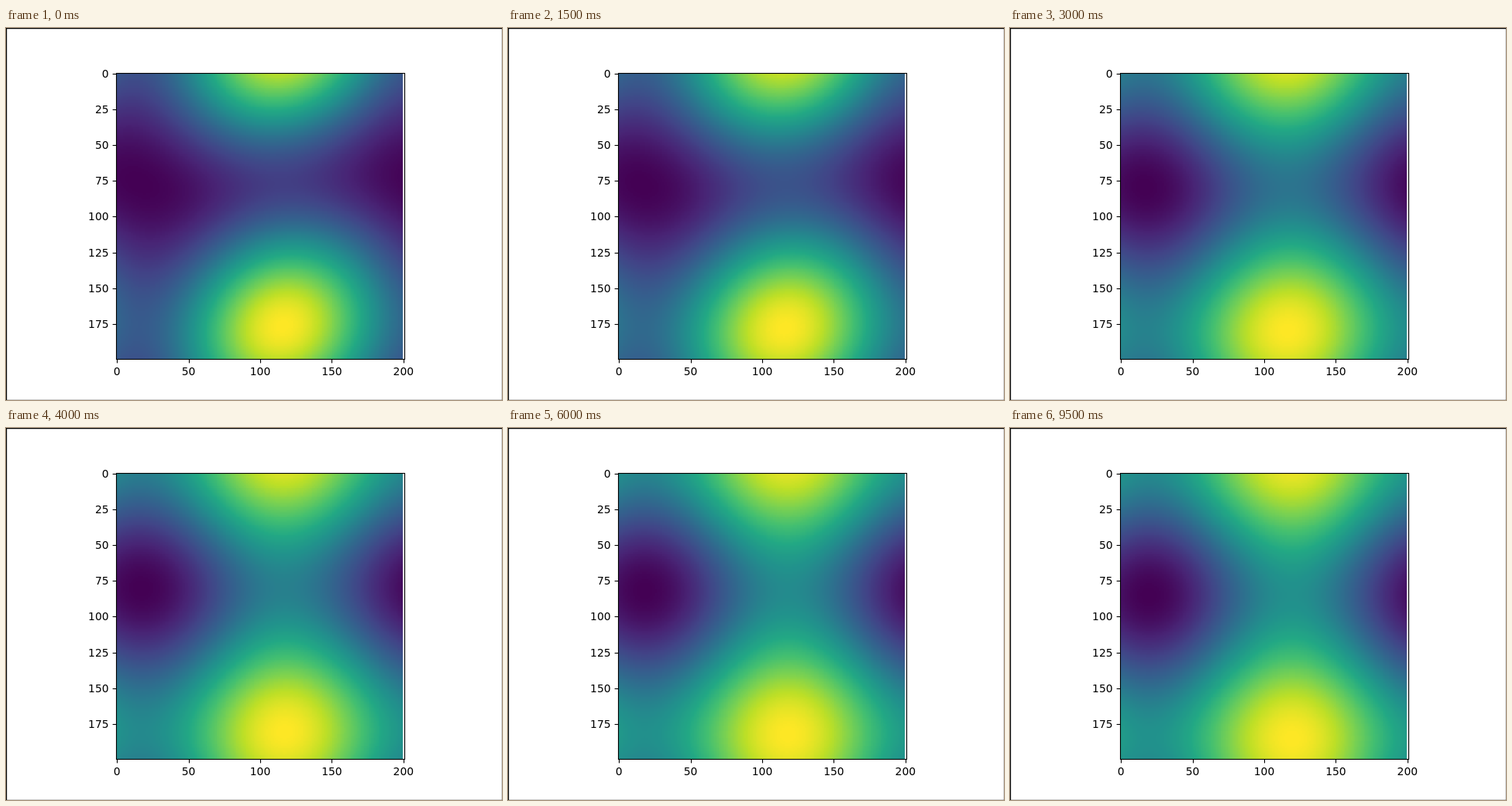
Animation of 640 by 480 pixels, one loop 10 s. Source, as an HTML page with a canvas:

```html
<!DOCTYPE html>
<html>
<head>
<meta charset="utf-8">
<style>
html, body { margin: 0; width: 100%; height: 100%; overflow: hidden; background: #fff; }
canvas { display: block; }
</style>
</head>
<body>
<canvas id="stage" width="640" height="480"></canvas>
<script>
const SIZE = 200, LEFT = 142.3, TOP = 57.6, SCALE = 1.848;
const ctx = document.getElementById('stage').getContext('2d');
const grid = document.createElement('canvas');
grid.width = grid.height = SIZE;
const gridCtx = grid.getContext('2d');
const image = gridCtx.createImageData(SIZE, SIZE);

const stops = '440154 482475 414487 355f8d 2a788e 21918c 22a884 44bf70 7ad151 bddf26 fde725'
  .split(' ').map(hex => [0, 2, 4].map(i => parseInt(hex.slice(i, i + 2), 16)));
const palette = Array.from({ length: 256 }, (_, i) => {
  const p = i / 255 * 10, k = Math.min(9, Math.floor(p));
  return stops[k].map((v, c) => Math.round(v + (stops[k + 1][c] - v) * (p - k)));
});

// Diffusing periodic field: two plane waves plus decaying cross terms.
function drawField(step) {
  const decay = 0.76 ** step;
  const cross = 0.1325 * decay, skew = -0.045 * decay;
  const bias = 0.025 * 0.85 ** step;
  const a = 0.25 - bias, b = 0.25 + bias;
  const peakX = 115.8 + 0.22 * step;
  const peakY = 177.5 + 0.42 * step - 1.5 * 0.3 ** step;
  const turn = 2 * Math.PI / SIZE;
  for (let y = 0, i = 0; y < SIZE; y++) {
    const cy = Math.cos((y - peakY) * turn), sy = Math.sin((y - peakY) * turn);
    for (let x = 0; x < SIZE; x++, i += 4) {
      const cx = Math.cos((x - peakX) * turn), sx = Math.sin((x - peakX) * turn);
      const v = 0.5 - cross + a * cx + b * cy + cross * cx * cy + skew * sx * sy;
      const color = palette[Math.max(0, Math.min(255, Math.floor(v * 256)))];
      image.data.set(color, i);
      image.data[i + 3] = 255;
    }
  }
  gridCtx.putImageData(image, 0, 0);
  ctx.imageSmoothingEnabled = false;
  ctx.drawImage(grid, 142, 58, 370, 370);
}

function line(x1, y1, x2, y2) {
  ctx.beginPath();
  ctx.moveTo(x1, y1);
  ctx.lineTo(x2, y2);
  ctx.stroke();
}

const snap = v => Math.round(v) + 0.5;

function drawAxes() {
  ctx.strokeStyle = ctx.fillStyle = '#000';
  ctx.lineWidth = 1.39;
  ctx.strokeRect(0.5, 0.5, 640, 480);
  ctx.lineWidth = 1.11;
  ctx.strokeRect(142.5, 58.5, 372, 369);
  ctx.font = '13.89px "DejaVu Sans", sans-serif';
  ctx.textAlign = 'center';
  for (let v = 0; v <= 200; v += 50) {
    const x = LEFT + (v + 0.5) * SCALE;
    line(snap(x), 427.5, snap(x), 432.4);
    ctx.fillText(v, x, 448);
  }
  ctx.textAlign = 'right';
  for (let v = 0; v < 200; v += 25) {
    const y = TOP + (v + 0.5) * SCALE;
    line(137.6, snap(y), 142.5, snap(y));
    ctx.fillText(v, 132.6, Math.round(y + 5));
  }
}

const start = performance.now();
let shown = -1;
function tick() {
  const t = (performance.now() - start) % 10000;
  const step = Math.max(0, Math.floor(t / 500) - 2);
  if (step !== shown) {
    shown = step;
    ctx.fillStyle = '#fff';
    ctx.fillRect(0, 0, 640, 480);
    drawField(step);
    drawAxes();
  }
  requestAnimationFrame(tick);
}
tick();
</script>
</body>
</html>
```
